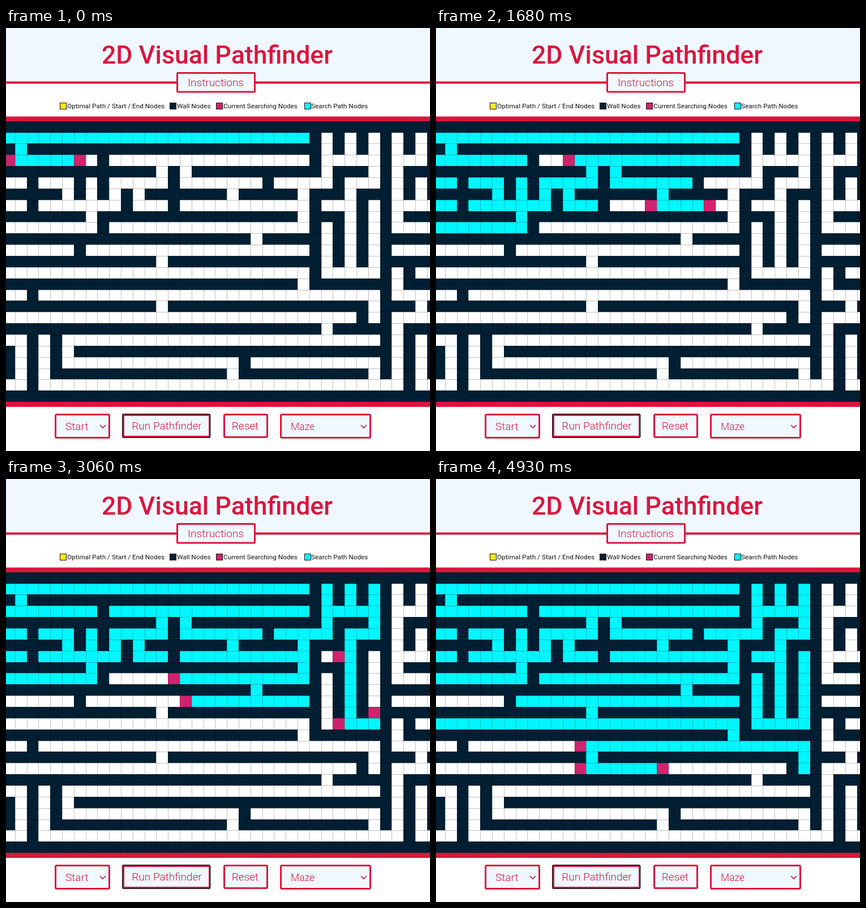
Write an HTML page with a canvas that moves like this. It is 749x748 px and loops after 4.98 s.

```html
<!DOCTYPE html>
<html lang="en">
<head>
<meta charset="utf-8">
<title>2D Visual Pathfinder</title>
<style>
  html, body { margin: 0; width: 100%; height: 100%; overflow: hidden; background: #fff; }
  svg, canvas { position: absolute; left: 0; top: 0; display: block; }
  text { font-family: Roboto, "Liberation Sans", sans-serif; }
  .title { font-size: 44.6px; font-weight: 500; fill: #dc143c; }
  .label { font-size: 19px; font-weight: 300; fill: #dc143c; }
  .key { font-size: 11.8px; fill: #111; }
  .box { fill: #f0f8ff; stroke: #dc143c; stroke-width: 3; }
  .swatch { stroke: #111; stroke-width: 1; }
  .arrow { fill: none; stroke: #b0183a; stroke-width: 1.6; }
</style>
</head>
<body>
<svg width="749" height="748" viewBox="0 0 749 748">
  <rect width="749" height="96" fill="#f0f8ff"/>
  <rect y="94.5" width="749" height="4" fill="#dc143c"/>
  <text class="title" x="373" y="63" text-anchor="middle">2D Visual Pathfinder</text>
  <rect class="box" x="302.5" y="79.5" width="137" height="33.5" rx="1.5"/>
  <text class="label" x="370.5" y="102.5" text-anchor="middle">Instructions</text>

  <rect class="swatch" x="95.5" y="132.5" width="11" height="11" fill="#ffe815"/>
  <text class="key" x="108" y="142">Optimal Path / Start / End Nodes</text>
  <rect class="swatch" x="289.5" y="132.5" width="11" height="11" fill="#001f33"/>
  <text class="key" x="302" y="142">Wall Nodes</text>
  <rect class="swatch" x="371.5" y="132.5" width="11" height="11" fill="#d1226d"/>
  <text class="key" x="384" y="142">Current Searching Nodes</text>
  <rect class="swatch" x="527.5" y="132.5" width="11" height="11" fill="#00f7ff"/>
  <text class="key" x="539" y="142">Search Path Nodes</text>

  <rect y="156.5" width="749" height="513.5" fill="#dc143c"/>

  <rect class="box" x="87.5" y="683.5" width="95" height="41" rx="2"/>
  <text class="label" x="105" y="710.5">Start</text>
  <path class="arrow" d="M166 702l5 5 5-5"/>
  <rect class="box" x="207.5" y="684.5" width="152" height="38" rx="1"/>
  <rect x="205.7" y="682.7" width="155" height="41.6" rx="2" fill="none" stroke="#111" stroke-width="1.4"/>
  <text class="label" x="284" y="710" text-anchor="middle">Run Pathfinder</text>
  <rect class="box" x="385.5" y="683.5" width="76" height="40" rx="2"/>
  <text class="label" x="422.5" y="710" text-anchor="middle">Reset</text>
  <rect class="box" x="485.5" y="683.5" width="158" height="41" rx="2"/>
  <text class="label" x="503" y="710.5" style="font-size:17.5px">Maze</text>
  <path class="arrow" d="M627 702l5 5 5-5"/>
</svg>
<canvas id="maze" width="749" height="748"></canvas>

<script>
const ctx = document.getElementById("maze").getContext("2d");
const COLS = 37, ROWS = 25, LOOP = 4980;
const colX = c => Math.floor(-4.58 + 20.8 * c);
const rowY = r => Math.floor(165.15 + 19.86 * r);

// Odd rows are open except at these columns; even rows are walls except at them.
const gates = [
  "", "26 28 30 32 34 36",
  "1 27 29 31 33 35", "-2 8 26 32 36",
  "-1 13 15 27 31 33", "2 6 8 14 22 28 32 34 36",
  "-3 5 7 9 11 19 25 29 33 35", "2 10 14 26 30 32",
  "-1 7 25 29 31 33", "-2 8 26 28 30 32",
  "21 27 29 31", "6 26 28 30 32",
  "13 27 29 31", "-2 26 32 34",
  "25 33", "2 32",
  "13 31 35", "30 32",
  "27 33", "2 4 32 34 36",
  "1 3 5 33 35", "0 2 4 20 32 34 36",
  "1 3 19 31 33 35", "2 34", ""
].map(s => new Set(s ? s.split(" ").map(Number) : []));

const isOpen = (c, r) =>
  c >= -3 && c < COLS && r > 0 && r < ROWS - 1 && gates[r].has(c) !== (r % 2 === 1);

// A* with Manhattan distance to a far lower-right goal: steps left or up raise
// the score by 2, turns by 1, and ties go to the newest node.
function search() {
  const nodes = new Map(), queue = [];
  const push = (c, r, dx, dy, score, found) => {
    const node = { c, r, dx, dy, score, found, done: Infinity };
    nodes.set(c + "," + r, node);
    queue.push(node);
  };
  for (let c = 0; c < 26; c++) nodes.set(c + ",1", { found: 0, done: 0 });
  push(1, 2, 0, 1, 0, 0);
  for (let count = 1; queue.length; count++) {
    let best = 0;
    queue.forEach((n, i) => { if (n.score <= queue[best].score) best = i; });
    const n = queue.splice(best, 1)[0];
    n.done = count;
    for (const [dx, dy] of [[0, -1], [-1, 0], [0, 1], [1, 0]]) {
      const c = n.c + dx, r = n.r + dy;
      if (!isOpen(c, r) || nodes.has(c + "," + r)) continue;
      const turn = dx !== n.dx || dy !== n.dy;
      push(c, r, dx, dy, n.score + (dx + dy < 0 ? 2 : 0) + (turn ? 1 : 0), count);
    }
  }
  return nodes;
}
const nodes = search();

// Times at which the picture refreshes
const ticks = [0, 80, 180];
for (const start of [360, 920, 1490, 2040, 2600, 3160, 3720, 4270])
  for (const d of [0, 80, 180, 280, 370, 460]) ticks.push(start + d);
ticks.push(4830, 4930);

// Search progress: [time, nodes expanded]
const pace = [[0, 6], [920, 47], [1670, 84], [2120, 106], [3060, 149], [3800, 184], [4930, 234]];

function expanded(time) {
  let t = 0;
  for (const k of ticks) if (k <= time) t = k;
  let i = 1;
  while (i < pace.length - 1 && pace[i][0] < t) i++;
  const [t0, n0] = pace[i - 1], [t1, n1] = pace[i];
  return Math.round(n0 + (n1 - n0) * (t - t0) / (t1 - t0));
}

function colour(c, r, n) {
  if (!isOpen(c, r)) return "#001f33";
  const node = nodes.get(c + "," + r);
  if (!node || node.found > n) return "#fff";
  return node.done <= n ? "#00f7ff" : "#d1226d";
}

function draw(n) {
  for (let r = 0; r < ROWS; r++)
    for (let c = 0; c < COLS; c++) {
      ctx.fillStyle = colour(c, r, n);
      ctx.fillRect(colX(c), rowY(r), colX(c + 1) - colX(c), rowY(r + 1) - rowY(r));
    }
  ctx.fillStyle = "rgba(0,0,0,.24)";
  for (let c = 1; c < COLS; c++) ctx.fillRect(colX(c), rowY(0), 1, rowY(ROWS) - rowY(0));
  for (let r = 1; r < ROWS; r++) ctx.fillRect(0, rowY(r), 749, 1);
}

let shown = -1;
const begin = performance.now();
function frame() {
  const n = expanded((performance.now() - begin) % LOOP);
  if (n !== shown) draw(shown = n);
  requestAnimationFrame(frame);
}
frame();
</script>
</body>
</html>
```
